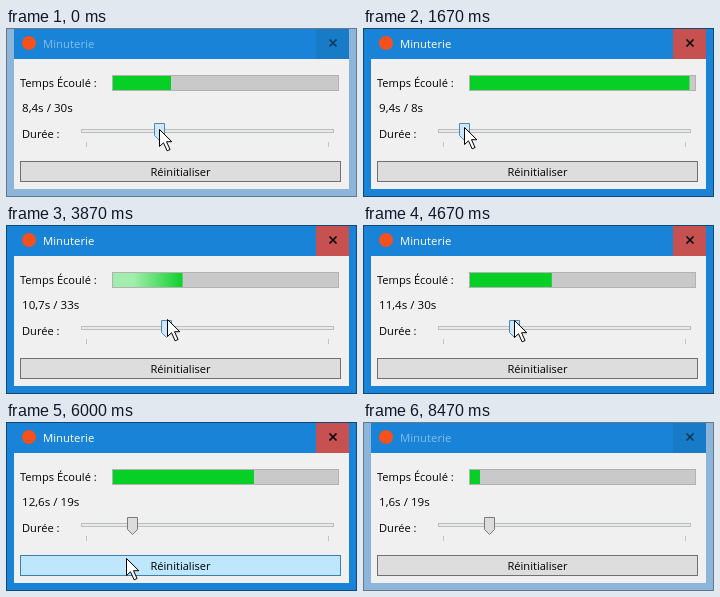
Animation of 351 by 169 pixels, one loop 8590 ms. Source, as an HTML page with a canvas:

```html
<!DOCTYPE html>
<html lang="fr">
<head>
<meta charset="utf-8">
<title>Minuterie</title>
<style>
  html, body { margin: 0; width: 100%; height: 100%; overflow: hidden; }
  canvas { display: block; }
</style>
</head>
<body>
<canvas id="stage" width="351" height="169"></canvas>
<script>
const ctx = document.getElementById('stage').getContext('2d');
const LOOP = 8590, RESET = 6743;

// Rows are [time, value, ...]
const pointerKeys = [
  [0, 153, 101], [70, 153, 101], [930, 119, 97], [1350, 101, 100], [2530, 101, 97],
  [2800, 129, 94], [3200, 161, 94], [4470, 161, 94], [5200, 126, 96], [5290, 126, 97],
  [5400, 120, 108], [5750, 120, 136], [7870, 120, 136], [8300, 112, 172]
];
const thumbKeys = [
  [0, 153], [70, 153], [930, 119.5], [1350, 101], [2530, 101], [2800, 128.5],
  [3200, 160.5], [4470, 160.5], [5200, 126.5]
];
const barKeys = [
  [0, 165], [300, 166], [930, 185], [1700, 332], [2570, 332], [2700, 285], [2800, 235],
  [2950, 205], [3200, 176], [4470, 177], [5270, 224], [5400, 231], [5750, 248],
  [6250, 248], [6530, 254], [RESET, 258], [RESET, 107], [7500, 107], [7730, 111], [8100, 117]
];

function track(keys, t, col = 1) {
  const i = keys.findIndex(k => k[0] > t);
  if (i < 0) return keys[keys.length - 1][col];
  if (i === 0) return keys[0][col];
  const a = keys[i - 1], b = keys[i];
  return a[col] + (b[col] - a[col]) * (t - a[0]) / (b[0] - a[0]);
}

function elapsed(t) {
  if (t >= RESET) return (t - RESET) * 0.00093;
  return t < 2530 ? Math.min(8.44 + t * 0.00094, 9.48) : 12.1 + (t - 5395) * 0.000915;
}

function rect(x, y, w, h, fill) {
  ctx.fillStyle = fill;
  ctx.fillRect(x, y, w, h);
}

function box(x, y, w, h, fill, border) {
  rect(x, y, w, h, border);
  rect(x + 1, y + 1, w - 2, h - 2, fill);
}

function text(str, x, y, size = 11.1, color = '#000', align = 'left') {
  ctx.font = `${size}px "Open Sans", sans-serif`;
  ctx.textAlign = align;
  ctx.fillStyle = color;
  ctx.fillText(str, x, y);
}

function polygon(points, fill, border) {
  ctx.beginPath();
  points.forEach(([x, y]) => ctx.lineTo(x, y));
  ctx.closePath();
  ctx.fillStyle = fill;
  ctx.fill();
  ctx.strokeStyle = border;
  ctx.lineWidth = 1;
  ctx.stroke();
}

function drawWindow(active) {
  box(0, 0, 351, 169, active ? '#1883d7' : '#8cb5d9', active ? '#12476f' : '#64798a');
  rect(8, 1, 335, 30, '#1883d7');
  rect(8, 31, 335, 130, '#f0f0f0');
  ctx.beginPath();
  ctx.arc(23, 15, 7, 0, 7);
  ctx.fillStyle = '#f4511e';
  ctx.fill();
  text('Minuterie', 37, 20, 11.35, active ? '#fff' : '#82bfec');
  rect(310, 1, 33, 30, active ? '#c75050' : '#187bc8');
  ctx.beginPath();
  ctx.moveTo(323.5, 11.5); ctx.lineTo(330.5, 18.5);
  ctx.moveTo(330.5, 11.5); ctx.lineTo(323.5, 18.5);
  ctx.strokeStyle = active ? '#000' : '#0b3658';
  ctx.lineWidth = 1.6;
  ctx.stroke();
}

function drawProgress(t) {
  box(106, 47, 227, 16, '#c9c9c9', '#b2b2b2');
  const end = track(barKeys, t);
  rect(107, 48, end - 107, 14, '#06d025');
  // A pale sheen sweeps over the bar while it is running
  const start = [470, 3620, 5100].filter(s => s <= t).pop();
  if (start === undefined || t - start > 1100) return;
  const mid = 46 + (t - start) * 0.288;
  const glow = ctx.createLinearGradient(mid - 60, 0, mid + 60, 0);
  glow.addColorStop(0, 'rgba(255,255,255,0)');
  glow.addColorStop(0.42, 'rgba(255,255,255,.62)');
  glow.addColorStop(0.58, 'rgba(255,255,255,.62)');
  glow.addColorStop(1, 'rgba(255,255,255,0)');
  rect(107, 48, end - 107, 14, glow);
}

function drawSlider(t) {
  box(75, 101, 253, 4, '#e7eaea', '#bdbdbd');
  rect(80, 114, 1, 5, '#c4c4c4');
  rect(322, 114, 1, 5, '#c4c4c4');
  const x = Math.floor(track(thumbKeys, t)) + 0.5, hot = t < 5330;
  polygon([[x - 5, 95.5], [x + 5, 95.5], [x + 5, 107.5], [x, 112.5], [x - 5, 107.5]],
    hot ? '#cfe8f7' : '#dcdcdc', hot ? '#4a88b5' : '#7a7a7a');
}

function drawButton(t, py) {
  const pressed = t > 6640 && t < RESET, hot = py > 132 && py < 154;
  box(14, 133, 321, 21,
    pressed ? '#98d1ef' : hot ? '#bee6fd' : '#dddddd',
    pressed ? '#2c628b' : hot ? '#3c7fb1' : '#707070');
  text('Réinitialiser', 174.5, 148, 11.1, '#000', 'center');
}

function drawPointer(x, y) {
  const shape = [[0, 0], [0, 17], [4, 13.3], [7.6, 21.3], [10.6, 20], [7, 12.2], [12.3, 12.2]];
  polygon(shape.map(([dx, dy]) => [x + dx + 0.5, y + dy + 0.5]), '#fff', '#000');
}

function draw(t) {
  drawWindow(t >= 70 && t < 8440);
  text('Temps Écoulé :', 14, 59);
  drawProgress(t);
  const seconds = (Math.floor(elapsed(t) * 10) / 10).toFixed(1).replace('.', ',');
  const duration = Math.floor((track(thumbKeys, t - 60) - 80) / 2.42);
  text(`${seconds}s / ${duration}s`, 16, 84, 11.6);
  text('Durée :', 16, 110);
  drawSlider(t);
  const px = Math.round(track(pointerKeys, t, 1)), py = Math.round(track(pointerKeys, t, 2));
  drawButton(t, py);
  drawPointer(px, py);
}

function tick() {
  draw(performance.now() % LOOP);
  requestAnimationFrame(tick);
}
tick();
</script>
</body>
</html>
```
